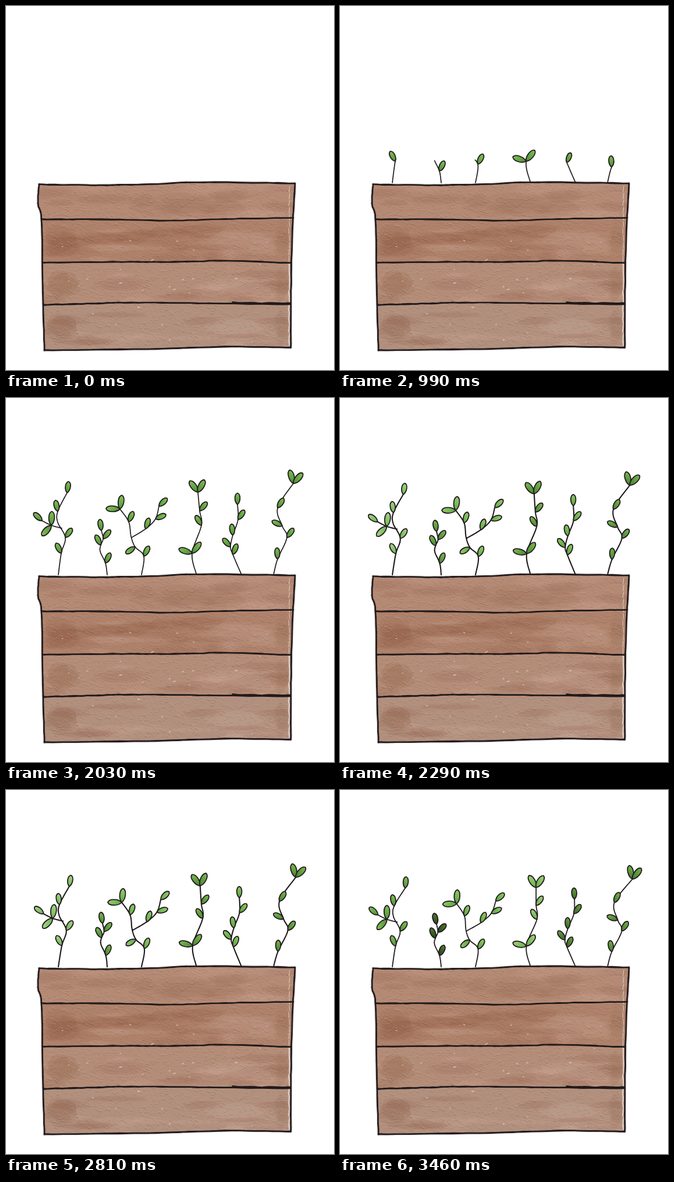
An HTML page with a canvas for the animation above (3590 ms loop, 564 by 626 pixels).

```html
<!DOCTYPE html>
<html lang="en">
<head>
<meta charset="utf-8">
<title>Growing planter</title>
<style>
html, body { margin: 0; width: 100%; height: 100%; overflow: hidden; background: #fff; }
canvas { display: block; }
</style>
</head>
<body>
<canvas id="stage" width="564" height="626"></canvas>
<script>
const W = 564, H = 626, LOOP = 3590, START = 470, STEP = 130, GROWN = 12;
const SOIL = 304, DENSITY = 8, INK = '#211a1c';
const ctx = document.getElementById('stage').getContext('2d');

let seed = 7;
const rnd = () => (seed = (seed * 16807) % 2147483647) / 2147483647;
const range = (a, b) => a + (b - a) * rnd();

// Catmull-Rom samples, DENSITY per segment
function smooth(pts) {
  const out = [];
  for (let i = 0; i < pts.length - 1; i++) {
    const a = pts[Math.max(i - 1, 0)], b = pts[i], c = pts[i + 1];
    const d = pts[Math.min(i + 2, pts.length - 1)];
    for (let j = 0; j < DENSITY; j++) {
      const u = j / DENSITY;
      out.push([0, 1].map(n => b[n] + 0.5 * u * (c[n] - a[n] +
        u * (2 * a[n] - 5 * b[n] + 4 * c[n] - d[n] + u * (3 * (b[n] - c[n]) + d[n] - a[n])))));
    }
  }
  out.push(pts[pts.length - 1]);
  return out;
}

function line(g, pts, width) {
  if (pts.length < 2) return;
  g.beginPath();
  pts.forEach(p => g.lineTo(p[0], p[1]));
  g.lineWidth = width;
  g.stroke();
}

// A pose redraws every plant with its own sway, height and tone
const poses = {
  young: { push: 0, power: 1, tall: 1, loose: 0, width: 1.7, tones: [47, 46, 48, 46, 46, 46] },
  bold: { push: 4, power: 1, tall: 0.98, loose: 6, width: 2.1, tones: [60, 44, 54, 44, 51, 43] },
  late: { push: 8, power: 2, tall: 0.96, loose: 6, width: 1.8, tones: [47, 26, 52, 57, 36, 41] }
};

// Node: x, y, then the lean in degrees from upright of each leaf sprouting there
const shoots = [];
const shoot = (plant, after, ...nodes) => shoots.push({ plant, after, nodes });

shoot(0, 0, [90,304], [95,267,-27], [102,240,36], [89,214], [89,195,-12], [105,163,8]);
shoot(0, 85, [96,224], [78,219,-137,2], [62,211,-47]);
shoot(1, 0, [174,304], [171,284,25], [162,264], [163,253,-27], [167,242,40], [164,228,-8]);
shoot(2, 0, [233,304], [237,272,27], [222,256,-125], [215,238], [211,213,23], [196,191,-88,8]);
shoot(2, 70, [216,240], [240,225,18], [257,208,67], [263,186,46]);
shoot(3, 0, [327,302], [320,267,-72,38], [336,219,-30], [333,194,40], [330,162,-36,28]);
shoot(4, 0, [405,304], [390,269,22], [386,256,-42], [390,236,-6], [399,209,34], [398,183,0]);
shoot(5, 0, [460,304], [467,277,-3], [483,240,36], [475,220,-64], [467,189,32], [494,147,-15,42]);

function sprout({ plant, after, nodes }, pose) {
  const moved = nodes.map(([x, y]) => {
    const h = (SOIL - y) / 150;
    return [x + pose.push * Math.pow(Math.abs(h), pose.power), SOIL - (SOIL - y) * pose.tall];
  });
  const pts = smooth(moved), at = [after];
  for (let i = 1; i < pts.length; i++) {
    at.push(at[i - 1] + Math.hypot(pts[i][0] - pts[i - 1][0], pts[i][1] - pts[i - 1][1]));
  }
  const leaves = nodes.flatMap(([, , ...leans], i) => leans.map(lean => ({
    x: moved[i][0], y: moved[i][1], at: at[i * DENSITY],
    angle: (lean - 90 + range(-1, 1) * pose.loose) * Math.PI / 180,
    size: leans.length > 1 ? 24 : 19.5
  })));
  return { pts, at, leaves, tone: pose.tones[plant] };
}

for (const pose of Object.values(poses)) pose.drawn = shoots.map(s => sprout(s, pose));

function drawLeaf({ x, y, angle, size }, tone, grow) {
  const len = size * grow, bend = (2 + 0.12 * size) * grow / 0.75;
  ctx.save();
  ctx.translate(x, y);
  ctx.rotate(angle);
  ctx.beginPath();
  ctx.moveTo(0, 0);
  ctx.bezierCurveTo(len * 0.25, -bend, len * 0.9, -bend, len, 0);
  ctx.bezierCurveTo(len * 0.9, bend, len * 0.25, bend, 0, 0);
  const fill = ctx.createLinearGradient(0, -bend, len, bend);
  fill.addColorStop(0, `hsl(106,42%,${tone - 10}%)`);
  fill.addColorStop(0.5, `hsl(100,42%,${tone}%)`);
  fill.addColorStop(1, `hsl(92,45%,${tone + 10}%)`);
  ctx.fillStyle = fill;
  ctx.fill();
  ctx.lineWidth = 1.8;
  ctx.stroke();
  ctx.restore();
}

function drawShoot({ pts, at, leaves, tone }, front, width) {
  ctx.strokeStyle = INK;
  line(ctx, pts.filter((p, i) => at[i] <= front), width);
  for (const leaf of leaves) {
    if (leaf.at <= front) drawLeaf(leaf, tone, Math.min(1, 0.5 + (front - leaf.at) / 10));
  }
}

// Watercolour wash: stacked wobbly patches with a darker rim
function wash(g, x, y, rx, ry, rgb, alpha) {
  for (let layer = 0; layer < 3; layer++) {
    const n = 14, size = 1 - layer * 0.2, pts = [];
    for (let i = 0; i < n; i++) {
      const a = i / n * 2 * Math.PI, r = size * range(0.75, 1.15);
      pts.push([x + Math.cos(a) * rx * r, y + Math.sin(a) * ry * r]);
    }
    const rim = smooth([...pts, pts[0]]);
    g.strokeStyle = `rgba(${rgb},${alpha * 0.5})`;
    g.fillStyle = `rgba(${rgb},${alpha})`;
    line(g, rim, 1.2);
    g.fill();
  }
}

// Pen line through key points: a steady stroke with a looser second pass
function inkLine(g, ...keys) {
  g.strokeStyle = INK;
  [[2.6, 0.5], [1.5, 1.2]].forEach(([width, loose]) => {
    const pts = smooth(keys).map(([x, y]) => [x + range(-loose, loose) * 0.6, y + range(-loose, loose)]);
    line(g, pts, width);
  });
}

function paintBox() {
  const box = document.createElement('canvas');
  box.width = W;
  box.height = H;
  const g = box.getContext('2d');
  g.lineCap = g.lineJoin = 'round';
  const top = [[57,307], [150,308], [238,307], [340,303], [497,305]];
  const right = [[497,305], [492,400], [490,500], [490,587]];
  const bottom = [[490,587], [380,586], [240,590], [66,592]];
  const left = [[66,592], [63,480], [61,367], [55,340], [57,307]];
  const edges = [top, right, bottom, left];
  g.beginPath();
  edges.flatMap(smooth).forEach(p => g.lineTo(p[0], p[1]));
  g.closePath();
  g.strokeStyle = 'rgba(120,115,115,0.25)';
  g.lineWidth = 5;
  g.stroke();
  g.save();
  g.clip();

  const dark = '134,84,58', pale = '206,178,162';
  ['#b48a74', '#ae816a', '#b48d78', '#b2907e'].forEach((color, row) => {
    const y = 295 + row * 73;
    g.fillStyle = color;
    g.fillRect(50, y, 450, 80);
    for (let i = 0; i < 16; i++) {
      wash(g, range(70, 480), y + range(15, 70), range(20, 70), range(4, 13),
        i % 2 ? dark : pale, 0.055);
    }
    if (row) {
      wash(g, 95, y + 38, 32, 27, dark, 0.12);
      wash(g, 475, y + 38, 14, 30, dark, 0.07);
      wash(g, 400, y + 40, 65, 18, pale, 0.07);
    }
  });
  for (let i = 0; i < 5; i++) wash(g, 110 + i * 55, 405 - i * 5, 50, 11, dark, 0.09);
  wash(g, 320, 344, 95, 20, dark, 0.08);

  // Paper grain: light strokes with a dark lower edge
  for (let i = 0; i < 4500; i++) {
    const x = range(56, 492), y = range(303, 590), len = range(2, 5), a = range(0.05, 0.2);
    g.strokeStyle = `rgba(226,200,186,${a})`;
    line(g, [[x, y], [x + len, y + len * 0.45]], 1.2);
    g.strokeStyle = `rgba(98,64,48,${a})`;
    line(g, [[x, y + 1.4], [x + len, y + 1.4 + len * 0.45]], 1.2);
  }
  // Bare paper flecks and gaps along the right side
  g.strokeStyle = 'rgba(238,228,222,0.75)';
  for (let i = 0; i < 30; i++) {
    const x = range(75, 480), y = range(385, 580);
    line(g, [[x, y], [x + range(-3, 4), y + range(-2, 2)]], range(0.8, 1.6));
  }
  for (let y = 310; y < 580; y += 12) {
    line(g, [[range(486, 488), y], [range(486, 488), y + 10]], y < 440 ? 1 : 2.4);
  }
  g.restore();

  edges.forEach(keys => inkLine(g, ...keys));
  inkLine(g, [61,367], [180,367], [290,369], [390,366], [494,364]);
  inkLine(g, [63,441], [200,440], [300,440], [380,438], [490,442]);
  inkLine(g, [64,514], [140,512], [215,510], [330,511], [488,513]);
  inkLine(g, [390,510], [440,511], [488,511]);
  return box;
}

const box = paintBox();
const sway = ['young', 'late', 'bold', 'late'];
ctx.lineCap = ctx.lineJoin = 'round';

function draw(t) {
  const k = Math.floor((t - START) / STEP);
  ctx.fillStyle = '#fff';
  ctx.fillRect(0, 0, W, H);
  ctx.drawImage(box, 0, 0);
  if (k < 0) return;
  const growing = k < GROWN;
  const pose = poses[growing ? 'young' : sway[(k - GROWN) % sway.length]];
  const front = growing ? 3 + 7 * k + 0.7 * k * k : Infinity;
  pose.drawn.forEach(s => drawShoot(s, front, pose.width));
}

const begin = performance.now();
function tick() {
  draw((performance.now() - begin) % LOOP);
  requestAnimationFrame(tick);
}
tick();
</script>
</body>
</html>
```
